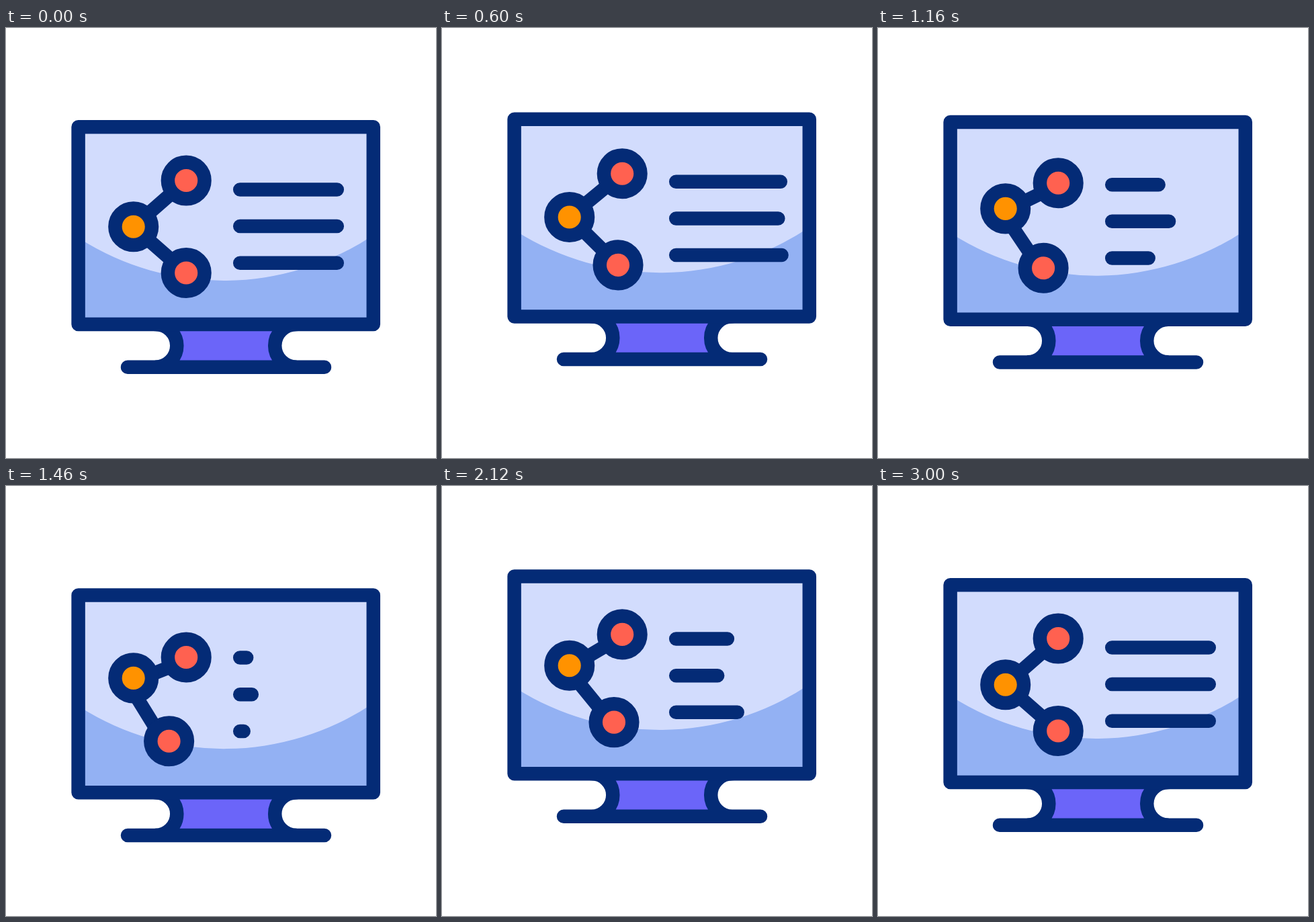
Animation, 640 px wide and 640 px high, one loop 3220 ms. Source, as an HTML page:

```html
<!DOCTYPE html>
<html lang="en">
<head>
<meta charset="utf-8">
<title>Shared screen</title>
<style>
  html, body { margin: 0; width: 100%; height: 100%; overflow: hidden; background: #fff; }
  svg { display: block; width: 100vw; height: 100vh; }
  .ink { stroke: #042b76; stroke-width: 20.5; stroke-linecap: round; stroke-linejoin: round; fill: none; }
  .red { fill: #ff6150; }
  .orange { fill: #ff9200; }
</style>
</head>
<body>
<svg viewBox="0 0 640 640">
  <g id="monitor">
    <path fill="#6b65f9" d="M222.5 441A31.8 31.8 0 0 1 222.5 504.6H432A31.8 31.8 0 0 1 432 441Z"/>
    <path class="ink" d="M222.5 441A31.8 31.8 0 0 1 222.5 504.6M432 441A31.8 31.8 0 0 0 432 504.6M181 504.7H474"/>
    <rect x="107.6" y="147.3" width="439.2" height="293.8" fill="#d2dcfd"/>
    <path fill="#93b1f3" d="M110 313.8A400 400 0 0 0 545 309.4V441H110Z"/>
    <rect class="ink" x="107.6" y="147.3" width="439.2" height="293.8"/>
    <path class="ink" id="rows"/>
    <path class="ink" id="links"/>
    <circle class="ink red" id="top" r="27.3"/>
    <circle class="ink red" id="bottom" r="27.3"/>
    <circle class="ink orange" id="left" r="27.3"/>
  </g>
</svg>
<script>
const LOOP = 3220, HOLD = 200, ACTIVE = 2800, STEP = 20;
const byId = id => document.getElementById(id);
const smooth = p => p * p * (3 - 2 * p);

// Eased interpolation through [time, value] pairs.
function track(keys, t) {
  if (t <= keys[0][0]) return keys[0][1];
  for (let i = 1; i < keys.length; i++) {
    const [t0, a] = keys[i - 1], [t1, b] = keys[i];
    if (t < t1) return a + (b - a) * smooth((t - t0) / (t1 - t0));
  }
  return keys[keys.length - 1][1];
}

const swing = (start, peak, end, size, t) => track([[start, 0], [peak, size], [end, 0]], t);

const BOB = [[0, 0], [700, -19.2], [1400, 19.2], [2100, -19.2], [2800, 0]];
const STRETCH = [[115, 0], [410, 12.8], [1300, -140], [1415, -140], [2340, 12.8], [2680, 0]];
const ROWS = [{ y: 240.4, delay: 60 }, { y: 295.1, delay: 120 }, { y: 349.7, delay: 0 }];

function place(id, [x, y]) {
  const node = byId(id);
  node.setAttribute("cx", x);
  node.setAttribute("cy", y);
}

function draw(now) {
  const elapsed = Math.floor((now % LOOP) / STEP) * STEP;
  const t = Math.min(Math.max(elapsed - HOLD, 0), ACTIVE);

  byId("monitor").setAttribute("transform", `translate(0 ${track(BOB, t)})`);

  const top = [268.2, 227 + swing(200, 1200, 2700, 12.8, t)];
  const left = [189.7, 295.7 + swing(175, 1300, 2785, -25.1, t)];
  const bottom = [268.2 + swing(0, 1250, 2550, -25.6, t), 364.5];
  place("top", top);
  place("left", left);
  place("bottom", bottom);

  // The links drift slightly off the node centres at full swing.
  const drift = swing(500, 1300, 2600, 1, t);
  byId("links").setAttribute("d",
    `M${left[0]} ${left[1] + 5 * drift}L${top[0]} ${top[1] + 5 * drift}` +
    `M${left[0] - 13 * drift} ${left[1]}L${bottom[0] - 8 * drift} ${bottom[1]}`);

  byId("rows").setAttribute("d", ROWS.map(({ y, delay }) =>
    `M348.2 ${y}H${492.8 + track(STRETCH, t - delay)}`).join(""));
}

const begin = performance.now();
function tick() {
  draw(performance.now() - begin);
  requestAnimationFrame(tick);
}
tick();
</script>
</body>
</html>
```
